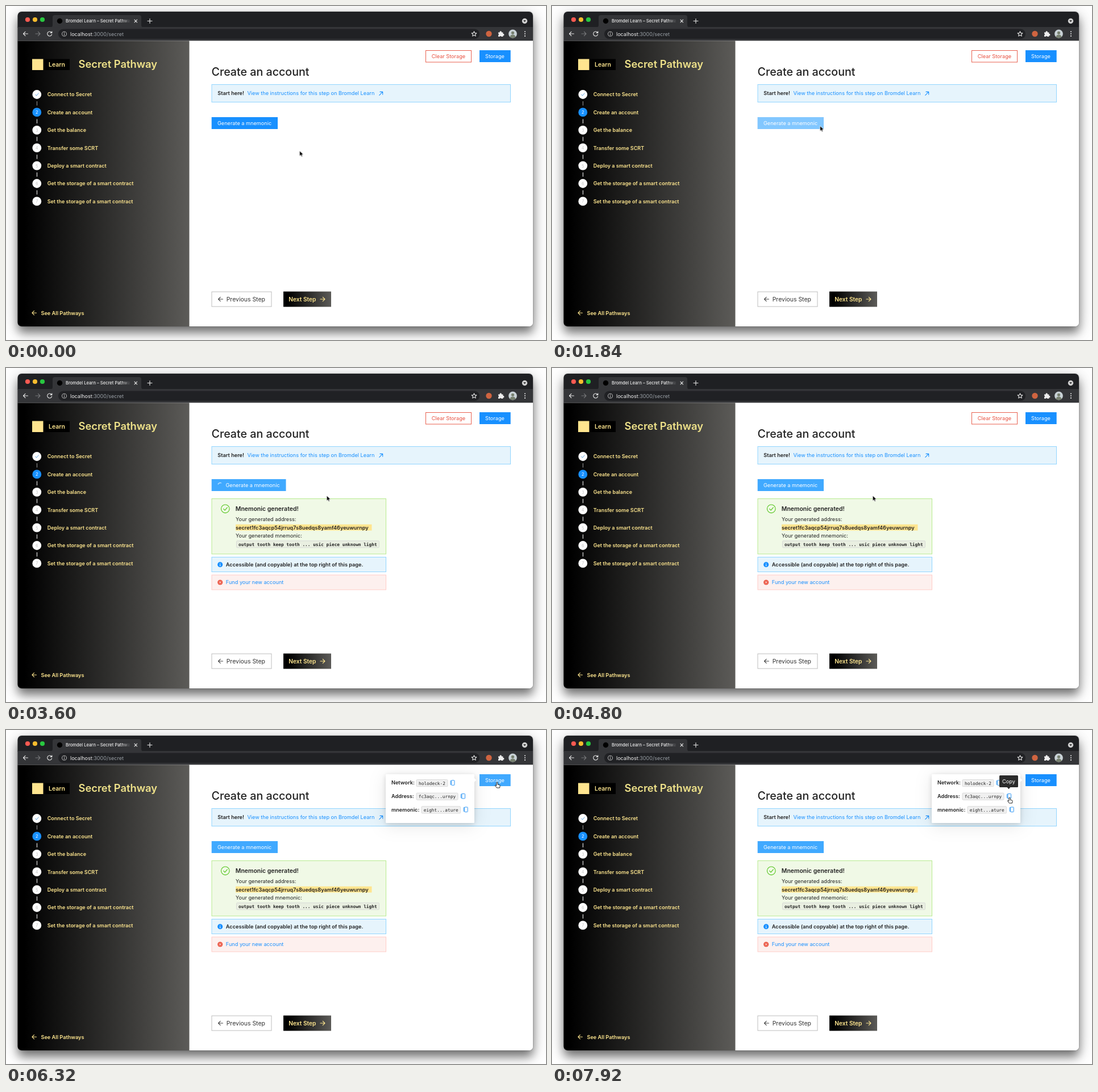
An HTML page for the animation above (8 s loop, 950x589 px).

```html
<!DOCTYPE html>
<html lang="en">
<head>
<meta charset="utf-8">
<title>Secret Pathway</title>
<style>
  html, body { margin: 0; width: 100%; height: 100%; overflow: hidden; background: #fff; }
  #shadow {
    position: absolute; left: 20.5px; top: 10px; width: 906.5px; height: 555px; border-radius: 7px;
    box-shadow: 0 11px 17px rgba(0,0,0,.52), 0 3px 36px rgba(0,0,0,.14), 0 0 2px rgba(0,0,0,.4);
  }
  svg { position: absolute; left: 0; top: 0; display: block; }
  text { font: 9.17px Inter, sans-serif; font-optical-sizing: none; fill: #222; white-space: pre; }
  .b { font-weight: 600; }
  .link { fill: #1890ff; }
  .white { fill: #fff; }
  .gold { fill: #ffe78f; }
  .mid { text-anchor: middle; }
  .big { font-size: 10.48px; }
  .mono { font: 7.79px "DejaVu Sans Mono", monospace; }
  .line { fill: none; stroke-width: 1.1; stroke-linecap: round; stroke-linejoin: round; }
  .info { fill: #e6f4fc; stroke: #91d5ff; }
  .code { fill: #f0f0f0; stroke: #d4d4d4; stroke-width: .8; }
  .copy { fill: #fff; stroke: #2f97f5; stroke-width: 1; }
  .popShadow { filter: drop-shadow(0 2px 4px rgba(0,0,0,.14)) drop-shadow(0 4px 15px rgba(0,0,0,.1)); }
  .hidden { opacity: 0; }
  #spinner { transform-origin: 376.9px 206.5px; }
</style>
</head>
<body>
<div id="shadow"></div>
<svg width="950" height="589" viewBox="0 0 950 589">
  <defs>
    <clipPath id="frame"><rect x="20.5" y="10" width="906.5" height="555" rx="7"/></clipPath>
    <linearGradient id="side"><stop offset=".04"/><stop offset="1" stop-color="#5c5b58"/></linearGradient>
    <linearGradient id="next"><stop offset=".1"/><stop offset="1" stop-color="#5c5b58"/></linearGradient>
    <linearGradient id="fade" gradientUnits="userSpaceOnUse" x1="204" x2="219">
      <stop stop-color="#eee"/><stop offset="1" stop-color="#eee" stop-opacity="0"/>
    </linearGradient>
    <radialGradient id="halo">
      <stop offset=".3" stop-opacity=".1"/><stop offset=".75" stop-opacity=".045"/><stop offset="1" stop-opacity=".02"/>
    </radialGradient>
  </defs>

  <g clip-path="url(#frame)">
    <!-- browser chrome -->
    <path d="M20 10h908v28H20z" fill="#1f2023"/>
    <path d="M20 37h908v24.5H20z" fill="#343538"/>
    <path d="M78 37.5q4 0 4-4V20q0-4 4-4h148q4 0 4 4v13.500q0 4 4 4z" fill="#343538"/>
    <circle cx="38" cy="24" r="4.1" fill="#ff5a52"/>
    <circle cx="51" cy="24" r="4.1" fill="#f7bc2e"/>
    <circle cx="64" cy="24" r="4.1" fill="#28c840"/>
    <circle cx="94.500" cy="26.500" r="4.700"/>
    <text x="105" y="29.300" style="font-size:7.600px;font-weight:500" fill="none"><tspan fill="url(#fade)">Bromdel Learn – Secret Pathway</tspan></text>
    <g class="line" stroke="#e8e8e8" stroke-width="1.300">
      <path d="M226 24.200l4.600 4.600m0-4.600l-4.600 4.600M249 26.500h8m-4-4v8"/>
      <path d="M38.500 49h-8m3.500-3.600L30.500 49l3.500 3.600"/>
      <path d="M80 46.700a4 4 0 1 0 .6 3.300M80.800 44.800v2.600h-2.600"/>
      <path d="M52 49h8m-3.500-3.600L60 49l-3.500 3.600" stroke="#77787b"/>
    </g>
    <rect x="92" y="40.500" width="741" height="17.500" rx="8.700" fill="#202124"/>
    <circle cx="102.500" cy="49.200" r="4" class="line" stroke="#aaa"/>
    <path d="M102.500 48.700v2.700m0-4.500v.5" class="line" stroke="#aaa"/>
    <text x="113" y="52.500" style="font-size:9.050px"><tspan fill="#f4f4f4">localhost</tspan><tspan fill="#9aa0a6">:3000/secret</tspan></text>
    <path d="M823.500 44.700l1.300 2.900 3.100.3-2.300 2.100.7 3.100-2.800-1.600-2.800 1.600.7-3.100-2.300-2.100 3.100-.3z" class="line" stroke="#ddd"/>
    <circle cx="849.500" cy="49" r="5.200" fill="#cf6440"/>
    <path d="M866 46.500h2.600a1.700 1.700 0 1 1 3.200 0h2.600v2.600a1.600 1.600 0 1 1 0 3.100v1.800h-3a1.500 1.500 0 0 0-2.800 0H866v-2.600a1.500 1.500 0 0 0 0-2.800z" fill="#eee"/>
    <circle cx="891.500" cy="49" r="7.400" fill="#c9d2d6"/>
    <path d="M886.500 54.400q1-4 5-4t5 4a7.400 7.400 0 0 1-10 0z" fill="#77806f"/>
    <circle cx="891.500" cy="47.300" r="2.600" fill="#77806f"/>
    <path d="M913 45.200v.1m0 3.700v.1m0 3.700v.1" class="line" stroke="#eee" style="stroke-width:2"/>
    <circle cx="912.500" cy="26.500" r="4.700" fill="#d0d0d0"/>
    <path d="M910.200 25.300h4.600l-2.300 2.900z" fill="#222"/>

    <!-- page -->
    <path d="M322 61.500h606V566H322z" fill="#fff"/>
    <path d="M20 61.500h302.500V566H20z" fill="url(#side)"/>
    <rect x="46" y="93.500" width="66" height="19.500"/>
    <rect x="46" y="93.500" width="19.500" height="19.500" fill="#ffe58f"/>
    <text x="75" y="107" class="big gold" style="font-weight:600">Learn</text>
    <text x="127.500" y="108.800" class="b" style="font-size:18.340px;fill:#efe28a">Secret Pathway</text>
    <g id="steps"></g>
    <path d="M53.500 541.200h-7.500m3.500-3.600l-3.600 3.600 3.600 3.600" class="line" stroke="#ffe78f"/>
    <text x="61.500" y="544.500" class="b gold">See All Pathways</text>

    <rect x="738.500" y="78.500" width="80" height="20.500" fill="#fff" stroke="#e8604f"/>
    <text x="778.500" y="91.900" class="mid" style="fill:#e8503f">Clear Storage</text>
    <rect id="storage" x="833" y="78" width="54.700" height="21" fill="#1890ff"/>
    <text x="860" y="91.900" class="mid white">Storage</text>
    <text x="361.500" y="123.400" style="font-size:19.650px;font-weight:500">Create an account</text>
    <rect x="362" y="138.500" width="525.500" height="31" class="info"/>
    <text x="372.300" y="157.400" class="b">Start here!</text>
    <text x="424.500" y="157.400" class="link">View the instructions for this step on Bromdel Learn</text>
    <path d="M656.800 157.300l5.600-5.600m-4.400-.3h4.700v4.700" class="line" stroke="#1890ff"/>

    <rect id="generate" x="361.700" y="196" width="116.300" height="21" fill="#1890ff"/>
    <text id="label" x="372" y="209.800" class="white">Generate a mnemonic</text>
    <g id="loader" class="hidden">
      <path id="spinner" d="M380.900 206.500a4 4 0 0 1-4 4" class="line" stroke="#fff"/>
    </g>
    <rect id="veil" class="hidden" x="361.700" y="196" width="116.300" height="21" fill="#fff"/>

    <g id="result" class="hidden">
      <rect x="362" y="230.500" width="306.500" height="97.500" fill="#f0f9e6" stroke="#b7eb8f"/>
      <circle cx="385.800" cy="248.300" r="7.300" class="line" stroke="#52c41a"/>
      <path d="M382.600 248.300l2.500 2.600 4.200-5" class="line" stroke="#52c41a"/>
      <text x="403.800" y="252.200" class="b big">Mnemonic generated!</text>
      <text x="404" y="270">Your generated address:</text>
      <rect x="404" y="275.800" width="239.500" height="10.800" fill="#ffe58f"/>
      <text x="404" y="284.500" class="b">secret1fc3aqcp54jrruq7s8uedqs8yamf46yeuwurnpy</text>
      <text x="404" y="299">Your generated mnemonic:</text>
      <rect x="405.500" y="304.800" width="251" height="12" rx="1.500" class="code" style="fill:#e9efe1"/>
      <text x="409" y="313.600" class="mono" style="font-weight:700">output tooth keep tooth ... usic piece unknown light</text>
      <rect x="362" y="333.500" width="306.500" height="26" class="info"/>
      <circle cx="376.700" cy="346.700" r="4.600" fill="#1890ff"/>
      <path d="M376.700 346.500v2.400m0-4.500v.2" class="line" stroke="#fff"/>
      <text x="386.800" y="350" class="b">Accessible (and copyable) at the top right of this page.</text>
      <rect x="362" y="365" width="306.500" height="26" fill="#fdf0ee" stroke="#ffccc7"/>
      <circle cx="376.700" cy="378" r="4.600" fill="#ec5f4d"/>
      <path d="M375.300 376.600l2.800 2.800m0-2.800l-2.800 2.800" class="line" stroke="#fff" style="stroke-width:.8"/>
      <text x="386.800" y="381.300" class="link">Fund your new account</text>
    </g>

    <rect x="362" y="504" width="105" height="26" fill="#fff" stroke="#bdbdbd"/>
    <path d="M381.500 517h-8m3.700-3.700l-3.700 3.700 3.700 3.700" class="line" stroke="#444"/>
    <text x="387.700" y="520.800" class="big" style="fill:#333">Previous Step</text>
    <rect x="488" y="503.500" width="84" height="27" fill="url(#next)"/>
    <text x="497.300" y="520.800" class="b gold" style="font-size:10.200px">Next Step</text>
    <path d="M553 517h8m-3.700-3.700l3.700 3.700-3.700 3.700" class="line" stroke="#ffe78f"/>

    <g id="building" class="hidden">
      <circle cx="882.500" cy="544" r="42" fill="url(#halo)"/>
      <rect x="870.500" y="525" width="24" height="20.500" rx="2"/>
    </g>

    <g id="popover" class="hidden">
      <path class="popShadow" d="M669.500 78H822.500q1.500 0 1.500 1.500V85l3.300 3.300-3.300 3.300V162.500q0 1.500-1.500 1.500H669.500q-1.500 0-1.500-1.500V79.500q0-1.500 1.500-1.500z" fill="#fff"/>
      <g id="fields"></g>
    </g>
    <g id="tooltip" class="hidden">
      <path d="M788.500 80h30q1.500 0 1.500 1.500v18q0 1.500-1.500 1.500h-12.200l-2.800 3.300-2.800-3.300H788.500q-1.500 0-1.500-1.500v-18q0-1.500 1.500-1.500z" fill="#2b2b2b"/>
      <text x="803.500" y="93.800" class="mid white">Copy</text>
    </g>
  </g>

  <g id="cursor">
    <path id="arrow" d="M0 0v9.400l2.200-2 1.300 3.100 1.700-.7-1.300-3h3z" stroke="#fff" stroke-width=".8"/>
    <path id="hand" class="hidden" d="M-1.100 1.100a1.100 1.100 0 0 1 2.200 0v3l2.900.7q1.200.3 1.100 1.600l-.6 3.600h-5.200l-2.600-3.600q-.5-1 .5-1.200l1.700 1.200z" fill="#fff" stroke="#111" stroke-width=".9"/>
  </g>
</svg>
<script>
const DURATION = 8000;
const byId = id => document.getElementById(id);

const stepNames = ['Connect to Secret', 'Create an account', 'Get the balance', 'Transfer some SCRT',
  'Deploy a smart contract', 'Get the storage of a smart contract', 'Set the storage of a smart contract'];

byId('steps').innerHTML = stepNames.map((name, i) => {
  const y = 156 + 31.4 * i;
  const active = i === 1;
  const mark = i === 0
    ? `<path d="M51.500 ${y}l2 2.200 3.800-4.300" class="line" stroke="#8fbfea"/>`
    : `<text x="54.300" y="${y + 2.900}" class="mid" style="font-size:7.500px;fill:${active ? '#fff' : '#c6c6c6'}">${i + 1}</text>`;
  const link = i < 6
    ? `<path d="M54.500 ${y + 12}v7.500" stroke="${i ? '#ddd' : '#888'}" stroke-width="1.200"/>` : '';
  return `<circle cx="54.300" cy="${y}" r="7.900" fill="${active ? '#1890ff' : '#fff'}"/>${mark}${link}
    <text x="72.700" y="${y + 3.300}" class="b gold" style="font-size:9px">${name}</text>`;
}).join('');

const fields = [
  ['Network:', 'holodeck-2', 722, 55, 785.5],
  ['Address:', 'fc3aqc...urnpy', 722, 73, 804],
  ['mnemonic:', 'eight...ature', 731, 68.5, 808.7],
];
byId('fields').innerHTML = fields.map(([name, value, x, width, iconX], i) => {
  const y = 93.3 + 23.6 * i;
  return `<text x="678" y="${y + 3}" class="b">${name}</text>
    <rect x="${x}" y="${y - 5.8}" width="${width}" height="12.200" rx="1.500" class="code"/>
    <text x="${x + width / 2}" y="${y + 3.200}" class="mono mid">${value}</text>
    <rect x="${iconX - 3.5}" y="${y - 4}" width="5.500" height="7.200" rx=".8" class="copy"/>
    <rect x="${iconX - 2}" y="${y - 4.500}" width="5.500" height="8.500" rx=".8" class="copy"/>`;
}).join('');

// Each step is [time, properties, easing towards the next step].
function play(id, steps) {
  const frames = steps.map(([time, props, easing = 'step-end']) => ({ offset: time / DURATION, easing, ...props }));
  frames.push({ offset: 1, ...steps.at(-1)[1] });
  byId(id).animate(frames, { duration: DURATION, iterations: Infinity });
}

const at = (x, y) => ({ transform: `translate(${x}px, ${y}px)` });
const fill = color => ({ fill: color });
const shown = opacity => ({ opacity });
const show = (id, ...spans) =>
  play(id, [[0, shown(0)], ...spans.flatMap(([from, to]) => [[from, shown(1)], [to, shown(0)]])]);

const blue = fill('#1890ff'), hover = fill('#40a9ff');
const smooth = 'ease-in-out';
const narrow = { width: '116.3px' }, wide = { width: '130.8px' };
const stretch = [[0, narrow], [1860, narrow, smooth], [2160, wide], [3600, wide, smooth], [3900, narrow]];

play('cursor', [
  [0, at(516.5, 255.3)], [720, at(516.5, 255.3), smooth],
  [1520, at(471.5, 211.3)], [1960, at(471.5, 211.3), smooth],
  [2720, at(564.2, 225)], [4960, at(564.2, 225), smooth],
  [5920, at(864, 92)], [6720, at(864, 92), smooth],
  [7440, at(805, 119)],
]);
const handSpans = [[1400, 1800], [5800, 6920], [7360, 7999]];
show('hand', ...handSpans);
play('arrow', [[0, shown(1)], ...handSpans.flatMap(([from, to]) => [[from, shown(0)], [to, shown(1)]])]);

play('generate', stretch.map(([time, size, easing]) => [time, { ...size }, easing]));
play('generate', [[0, blue], [1360, blue, 'linear'], [1520, hover]]);
play('veil', stretch);
play('veil', [[0, shown(0)], [1800, shown(.35)], [3560, shown(0)]]);
play('label', [[0, at(0, 0)], [1860, at(0, 0), smooth], [2160, at(14.5, 0)], [3600, at(14.5, 0), smooth], [3900, at(0, 0)]]);
play('loader', [[0, shown(0)], [1900, shown(0), 'linear'], [2160, shown(1)], [3600, shown(1), 'linear'], [3820, shown(0)]]);
byId('spinner').animate(
  [{ transform: 'rotate(-14deg)' }, { transform: 'rotate(346deg)' }],
  { duration: 1000, iterations: Infinity });

show('building', [2240, 3440]);
show('result', [3560, DURATION - 1]);
play('storage', [[0, blue], [5800, blue, 'linear'], [5960, hover], [6880, hover, 'linear'], [7040, blue]]);
play('popover', [[0, shown(0)], [5960, shown(0), 'ease-out'], [6160, shown(1)]]);
play('tooltip', [[0, shown(0)], [7480, shown(0), 'ease-out'], [7640, shown(1)]]);
</script>
</body>
</html>
```
